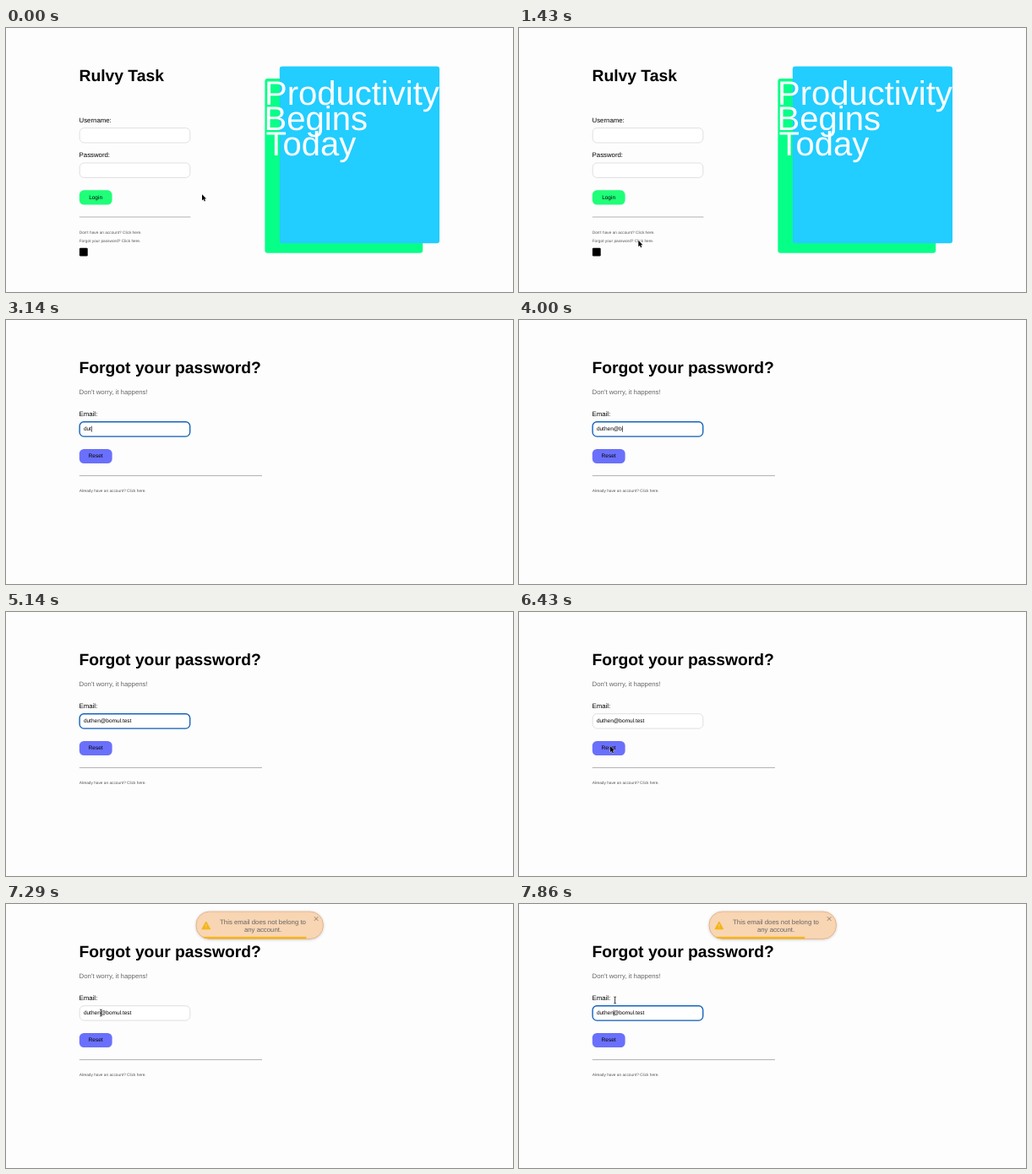
These frames come from a looping animation (600x313 px, 8000 ms). An HTML page:

```html
<!DOCTYPE html>
<html lang="en">
<head>
<meta charset="utf-8">
<title>Password reset</title>
<style>
  html, body { margin: 0; width: 100%; height: 100%; overflow: hidden; background: #fdfdfd; }
  svg { display: block; width: 100%; height: 100%; }
  text { font: 7.8px "Liberation Sans", Arial, Helvetica, sans-serif; text-rendering: geometricPrecision; white-space: pre; }
  .title { font-size: 19.3px; font-weight: bold; }
  .small { font-size: 4.78px; fill: #555; }
  .control { font-size: 6.5px; }
  .muted { fill: #666; }
  .hero { font-size: 40px; fill: #fff; }
  .mid { text-anchor: middle; }
  .field { fill: #fff; stroke: #d9d9dc; stroke-width: .8; }
  .rule { fill: #a9a9a9; }
</style>
</head>
<body>
<svg viewBox="0 0 600 313" xmlns="http://www.w3.org/2000/svg">
  <defs>
    <clipPath id="pill"><rect x="225" width="150.4" height="32.4" rx="15.5"/></clipPath>
    <filter id="shadow" x="-10%" y="-30%" width="120%" height="170%">
      <feDropShadow dx="0" dy=".6" stdDeviation="1.6" flood-color="#000" flood-opacity=".22"/>
    </filter>
  </defs>
  <rect width="600" height="313" fill="#fdfdfd"/>

  <g id="login">
    <text class="title" x="86.5" y="63.3">Rulvy Task</text>
    <text x="86.6" y="111.6">Username:</text>
    <rect class="field" x="87.2" y="118.6" width="130.6" height="17.4" rx="5"/>
    <text x="86.6" y="153.2">Password:</text>
    <rect class="field" x="87.2" y="160" width="130.6" height="17.4" rx="5"/>
    <rect x="86.8" y="192.3" width="38.8" height="17.2" rx="5.4" fill="#1fff78"/>
    <text class="control mid" x="106.1" y="202.8">Login</text>
    <rect class="rule" x="86.8" y="223.6" width="131.6" height=".9"/>
    <text class="small" x="86.7" y="243.6">Don't have an account? Click here.</text>
    <text class="small" x="86.7" y="254.1">Forgot your password? Click here.</text>
    <rect x="86.9" y="260.8" width="9.8" height="9.6" rx="1.2"/>
    <rect x="306.4" y="60" width="186.8" height="206.8" rx="3" fill="#05ff87"/>
    <rect x="323.8" y="45.4" width="189.2" height="209.8" rx="3" fill="#22cdff"/>
    <text class="hero" x="306" y="91">Productivity</text>
    <text class="hero" x="305.6" y="121">Begins</text>
    <text class="hero" x="307.6" y="151">Today</text>
  </g>

  <g id="reset">
    <text class="title" x="86.5" y="63.3">Forgot your password?</text>
    <text class="muted" x="86.6" y="87.7">Don't worry, it happens!</text>
    <text x="86.6" y="113.8">Email:</text>
    <rect class="field" x="87.2" y="120.7" width="130.6" height="17.4" rx="5"/>
    <rect id="ring" x="87.1" y="120.7" width="130.6" height="17.4" rx="5" fill="none" stroke="#1465bd" stroke-width="1.35"/>
    <text id="email" class="control" x="91.9" y="131.3"></text>
    <rect id="caret" y="125.6" width=".6" height="7.2"/>
    <rect x="86.8" y="152.9" width="38.8" height="17.2" rx="5.4" fill="#6a70fb"/>
    <text class="control mid" x="106.1" y="163.4">Reset</text>
    <rect class="rule" x="86.8" y="184.2" width="216.2" height=".9"/>
    <text class="small" x="86.7" y="204.4">Already have an account? Click here.</text>
  </g>

  <g id="toast">
    <rect x="225" width="150.4" height="32.4" rx="15.5" fill="#f8d5b3" stroke="#d99a63" stroke-width=".6" filter="url(#shadow)"/>
    <g clip-path="url(#pill)"><rect id="progress" x="225" y="29.8" height="2.6" fill="#f3b51c"/></g>
    <path d="M236.8 12.3L241.4 20.6H232.2Z" fill="#f3b617" stroke="#f3b617" stroke-width="1.2" stroke-linejoin="round"/>
    <path d="M236.8 14.8V17.6M236.8 18.7V19.6" stroke="#f8d5b3" stroke-width=".9"/>
    <text class="muted mid" x="304" y="14.6">This email does not belong to</text>
    <text class="muted mid" x="304" y="23.8">any account.</text>
    <path d="M364.8 6.2l4.6 4.6m0 -4.6l-4.6 4.6" stroke="#85776b" stroke-width=".9"/>
  </g>

  <path id="arrow" d="M0 0V7.2L1.7 5.7L2.8 8.2L4 7.7L2.9 5.2H5.1Z" stroke="#fff" stroke-width=".7" paint-order="stroke"/>
  <path id="beam" d="M-1.3 -4Q0 -4 0 -3.2Q0 -4 1.3 -4M0 -3.2V3.2M-1.3 4Q0 4 0 3.2Q0 4 1.3 4" fill="none" stroke="#111" stroke-width=".8"/>
</svg>
<script>
const LOOP = 8000, STEP = 1000 / 7;
const ADDRESS = "duthen@bomul.test";
const NAME_END = ADDRESS.indexOf("@");
const $ = id => document.getElementById(id);
const ui = Object.fromEntries(
  ["login", "reset", "ring", "email", "caret", "toast", "progress", "arrow", "beam"].map(id => [id, $(id)]));

const show = (el, on) => el.setAttribute("visibility", on ? "inherit" : "hidden");
const move = (el, x, y) => el.setAttribute("transform", `translate(${x} ${y})`);
const within = (t, a, b) => t >= a && t < b;
const smooth = p => p * p * (3 - 2 * p);
const easeOut = p => 1 - (1 - p) ** 3;

// Each key is [time, ...values].
function track(keys, t, ease) {
  if (t <= keys[0][0]) return keys[0].slice(1);
  for (let i = 1; i < keys.length; i++) {
    const [a, b] = [keys[i - 1], keys[i]];
    if (t < b[0]) {
      const p = ease((t - a[0]) / (b[0] - a[0]));
      return a.slice(1).map((v, j) => v + (b[j + 1] - v) * p);
    }
  }
  return keys[keys.length - 1].slice(1);
}

const pointer = [
  [140, 232, 197.3], [1290, 141.3, 252], [1600, 141.3, 252], [2290, 132, 129],
  [5000, 132, 129], [5860, 108, 159], [6500, 108, 159], [7000, 111.7, 137.8],
  [7290, 112.4, 129], [7500, 112.4, 129], [7850, 113.6, 114]
];
const typed = [
  [2700, 1], [2990, 2], [3130, 3], [3280, 4], [3420, 5], [3560, 6],
  [3850, 7], [3990, 8], [4280, 10], [4420, 12], [4560, 14], [4700, 17]
];
const bounce = [[0, -1250], [.6, 10.4], [.75, -4.2], [.9, 2.1], [1, 0]];
const TOAST_IN = 6480, TOAST_TIMER = 6620, CLICK = 6130, REFOCUS = 7420;

function draw(t) {
  const onReset = t >= 1565;
  show(ui.login, !onReset);
  show(ui.reset, onReset);

  const typing = within(t, 2420, CLICK);
  const editing = t >= REFOCUS;
  show(ui.ring, onReset && (typing || editing));

  const count = typed.reduce((n, [at, len]) => t >= at ? len : n, 0);
  ui.email.textContent = ADDRESS.slice(0, count);
  const caretAt = editing ? NAME_END : count;
  const offset = caretAt ? ui.email.getSubStringLength(0, caretAt) : 0;
  ui.caret.setAttribute("x", 91.9 + offset);
  show(ui.caret, editing || within(t, 2420, 4990) || within(t, 5490, 5990));

  const [drop] = track(bounce, (t - TOAST_IN) / 700, easeOut);
  show(ui.toast, t >= TOAST_IN);
  move(ui.toast, 0, 9 + drop);
  const left = Math.min(1, 1 - (t - TOAST_TIMER) / 5000);
  ui.progress.setAttribute("width", 150.4 * left);

  const [x, y] = track(pointer, t, smooth);
  const overField = within(y, 120.5, 137) && onReset || t > 7100;
  const hidden = within(t, 2990, 5200);
  show(ui.arrow, !overField && !hidden);
  show(ui.beam, overField && !hidden);
  move(ui.arrow, x, y);
  move(ui.beam, x, y);
}

function tick() {
  const t = performance.now() % LOOP;
  draw(Math.floor((t + 6) / STEP) * STEP);
  requestAnimationFrame(tick);
}
tick();
</script>
</body>
</html>
```
